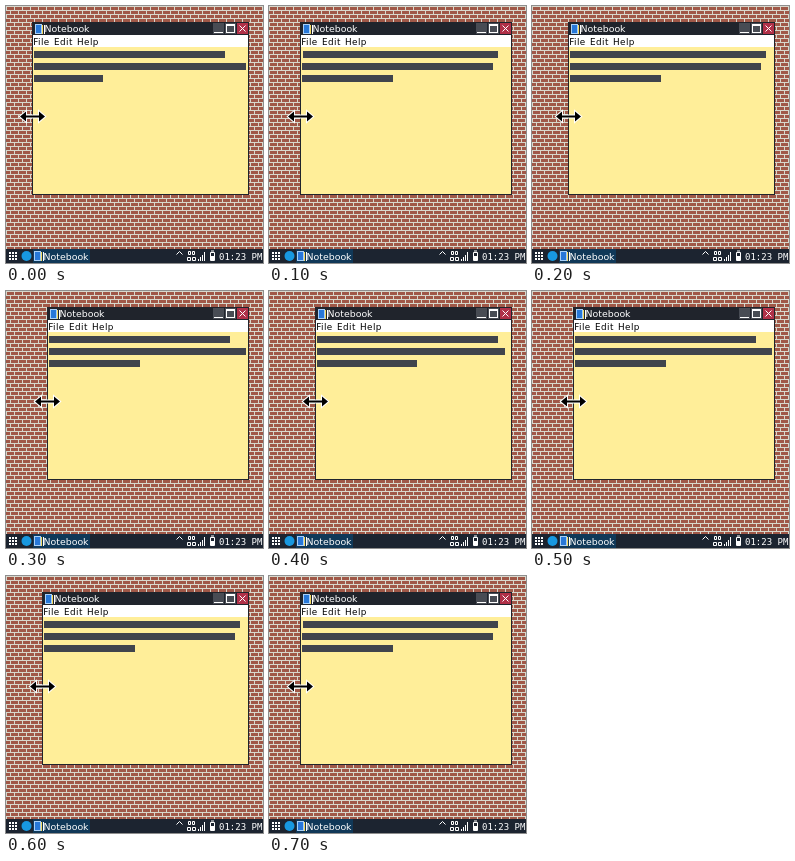
Recreate the animation shown at these times as an HTML page. Size 257 by 257 pixels, loop 0.8 s.

```html
<!DOCTYPE html>
<html lang="en">
<head>
<meta charset="utf-8">
<title>Notebook window</title>
<style>
  html, body { margin: 0; width: 100%; height: 100%; overflow: hidden; background: #a05848; }
  svg { display: block; width: 100vw; height: 100vh; shape-rendering: crispEdges; }
  text { font: 9.4px "DejaVu Sans", sans-serif; fill: #fff; }
  .menu { font-size: 8.8px; letter-spacing: .45px; word-spacing: 1px; fill: #000; }
  .clock { font: 9px "DejaVu Sans Mono", monospace; }
  .line { fill: none; stroke: #fff; }
</style>
</head>
<body>
<svg viewBox="0 0 257 257">
  <defs>
    <pattern id="bricks" width="8" height="8" patternUnits="userSpaceOnUse">
      <path fill="#a05848" d="M0 0h8v8h-8z"/>
      <path fill="#d8d8cc" d="M0 0h8v1h-8zM0 4h8v1h-8zM0 1h1v3h-1zM4 5h1v3h-1z"/>
    </pattern>
    <clipPath id="frame"><path d="M0 16H243V189H0z"/></clipPath>
    <g id="book">
      <path fill="#a8d0f8" d="M0 0h7v10h-7z"/>
      <path fill="#2878d8" d="M1 1h5v8h-5z"/>
      <path fill="#f4d860" d="M7 1h1v9h-1z"/>
      <path fill="#fff" d="M9 1h1v9h-1z"/>
    </g>
  </defs>

  <path fill="url(#bricks)" d="M0 0h257v243h-257z"/>

  <g clip-path="url(#frame)">
    <g class="slide">
      <path fill="#20242c" d="M0 16h217v173h-217z"/>
      <path fill="#fff" d="M1 29h217v12h-217z"/>
      <path fill="#ffee99" d="M1 41h217v147h-217z"/>
      <use href="#book" x="3" y="18"/>
      <text x="12.5" y="26">Notebook</text>
      <text class="menu" x="1.2" y="38.5">File Edit Help</text>
    </g>
    <path fill="#20242c" d="M242 16h1v173h-1z"/>
    <path fill="#484c54" d="M207 17h11v11h-11zM219 17h11v11h-11z"/>
    <path fill="#b03048" d="M231 17h11v11h-11z"/>
    <path fill="#fff" d="M208 26h9v1h-9zM220 18h9v2h-9z"/>
    <path class="line" d="M220.5 18.5h8v8h-8z"/>
    <path class="line" d="M233.5 19.5l6 6m0 -6l-6 6" shape-rendering="auto"/>
    <path id="bars" fill="#40444c"/>
  </g>

  <path class="slide" d="M-12 110.5l6-5v4h13v-4l6 5l-6 5v-4h-13v4z"
        stroke="#fff" stroke-width="2" paint-order="stroke" shape-rendering="auto"/>

  <path fill="#1c2430" d="M0 243h257v14h-257z"/>
  <path fill="#103858" d="M27 243h57v14h-57z"/>
  <path class="line" stroke-width="2" stroke-dasharray="2 1" d="M3 247h8M3 250h8M3 253h8"/>
  <circle cx="20.5" cy="250" r="5" fill="#1898e0" shape-rendering="auto"/>
  <use href="#book" x="28" y="245"/>
  <text x="37.5" y="253.5">Notebook</text>

  <g class="line" shape-rendering="auto">
    <path d="M170.5 248.5l3-3l3 3"/>
    <path d="M182.5 245.5h2v3h-2zM186.5 245.5h2v3h-2zM181.5 254.5v-3h3v3zM186.5 254.5v-3h3v3z"/>
    <path d="M192.5 255v-2M194.5 255v-4M196.5 255v-6M198.5 255v-9"/>
    <path d="M204.5 246.5h4v8h-4zM205 245h3"/>
  </g>
  <path fill="#fff" d="M205 250h3v4h-3z"/>
  <text class="clock" x="213" y="253.5">01:23 PM</text>
</svg>
<script>
  // Start and end of each wrapped line, from the widest window to the narrowest.
  const wraps = [
    [[28, 219], [28, 240], [28, 97]],
    [[34, 229], [33, 224], [33, 124]],
    [[38, 234], [38, 229], [38, 129]],
    [[43, 224], [43, 240], [43, 134]],
    [[48, 229], [48, 236], [48, 148]]
  ];
  const sliders = document.querySelectorAll('.slide');
  const bars = document.getElementById('bars');

  function draw(now) {
    const step = Math.floor(now / 100) % 8;
    const size = 4 - Math.abs(4 - step);
    const left = 26 + 5 * size;
    for (const part of sliders) part.setAttribute('transform', `translate(${left} 0)`);
    bars.setAttribute('d', wraps[size].map(([a, b], i) =>
      `M${a} ${45 + 12 * i}H${b}v7H${a}z`).join(''));
  }

  let start;
  function tick(now) {
    start ??= now;
    draw(now - start);
    requestAnimationFrame(tick);
  }
  draw(0);
  requestAnimationFrame(tick);
</script>
</body>
</html>
```
